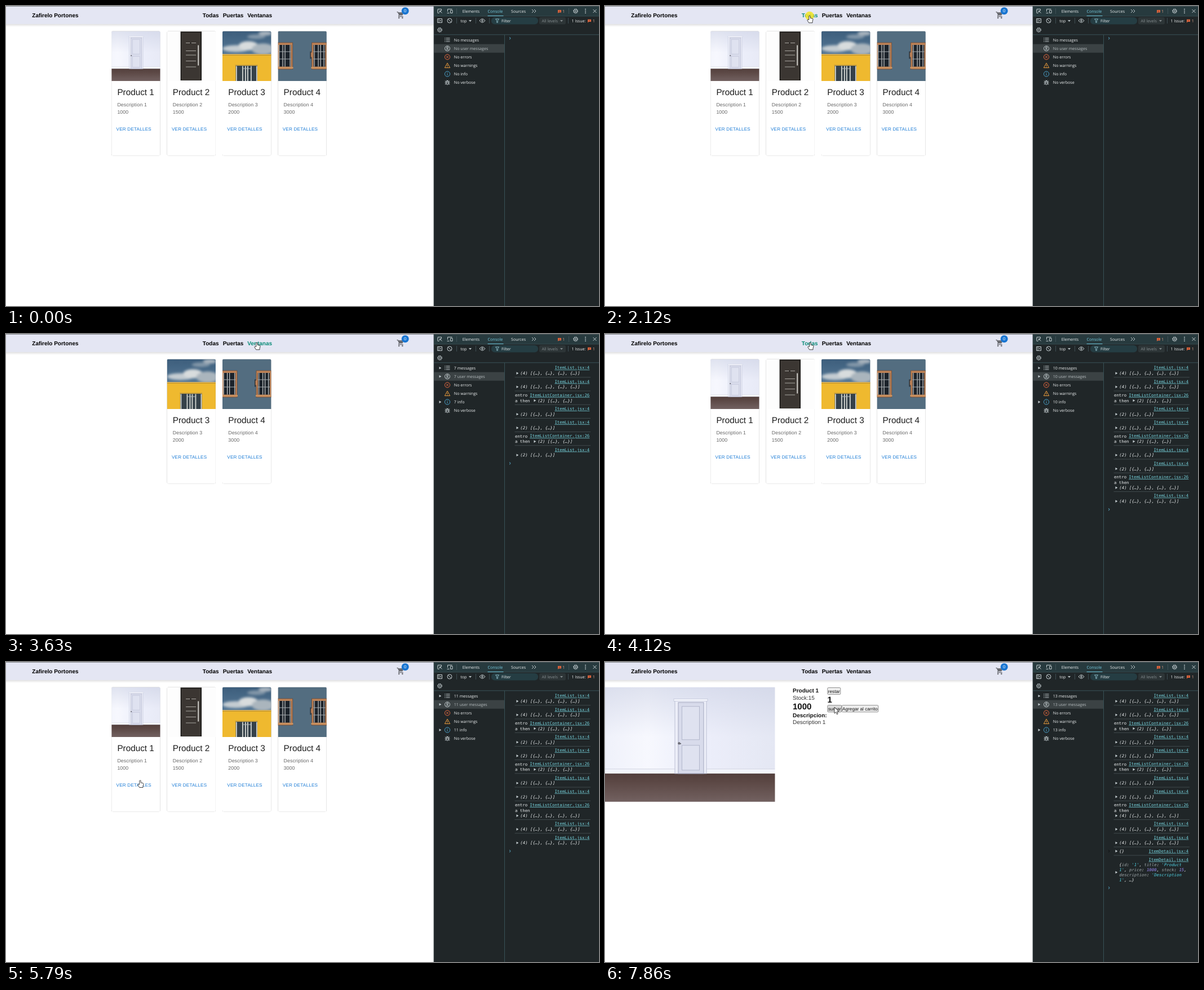
Animation, 1052 px wide and 532 px high, one loop 7.99 s. Source, as an HTML page:

```html
<!DOCTYPE html>
<html lang="es">
<head>
<meta charset="utf-8">
<title>Zafirelo Portones</title>
<style>
html, body { margin: 0; width: 100%; height: 100%; overflow: hidden; background: #fff; }
svg { display: block; width: 1052px; height: 532px; }
text { font-family: "Liberation Sans", Arial, sans-serif; text-rendering: geometricPrecision; }
.b { font-weight: bold; }
.card { filter: drop-shadow(0 .8px .7px rgba(0,0,0,.45)); }
.tools text { font: 7.1px "Open Sans", "Noto Sans", sans-serif; fill: #eceff0; }
.tools .log text { font: 7.35px "DejaVu Sans Mono", monospace; white-space: pre; }
.tools .log .i { font-style: italic; }
.tools .log .link { fill: #76d2dc; text-decoration: underline; text-anchor: end; }
.icon { fill: none; stroke: #c3cccf; stroke-width: 1; }
</style>
</head>
<body>
<svg viewBox="0 0 1052 532">
  <defs>
    <linearGradient id="wall"><stop stop-color="#eff1fa"/><stop offset=".25" stop-color="#f7f8fe"/><stop offset=".4" stop-color="#f1f3fc"/><stop offset=".6" stop-color="#eceefa"/><stop offset="1" stop-color="#e4e7f3"/></linearGradient>
    <linearGradient id="shade" x2="0" y2="1"><stop stop-color="#c3c9de" stop-opacity=".45"/><stop offset=".6" stop-color="#c3c9de" stop-opacity="0"/></linearGradient>
    <linearGradient id="floor" x2="0" y2="1"><stop stop-color="#523f3c"/><stop offset=".3" stop-color="#5c4845"/><stop offset="1" stop-color="#726160"/></linearGradient>
    <linearGradient id="sky" x2="0" y2="1"><stop stop-color="#3d5e7c"/><stop offset="1" stop-color="#6f93b1"/></linearGradient>
    <linearGradient id="under" x2="0" y2="1"><stop stop-color="#000" stop-opacity=".12"/><stop offset="1" stop-color="#000" stop-opacity="0"/></linearGradient>
    <filter id="soft"><feGaussianBlur stdDeviation="2"/></filter>
    <clipPath id="round"><path d="M0 88.5V2.5Q0 0 2.5 0H83.8Q86.3 0 86.3 2.5V88.5Z"/></clipPath>
  </defs>
  <rect width="1052" height="532" fill="#fff"/>
  <g id="page"></g>
  <rect y="32" width="759" height="5" fill="url(#under)"/>
  <rect width="759" height="32" fill="#e4e6f3"/>
  <rect width="759" height="1" fill="#85888c"/>
  <g id="nav" class="b" font-size="10"></g>
  <path transform="translate(692.8 8.7) scale(.62)" fill="#686a70" d="M7 18c-1.1 0-2 .9-2 2s.9 2 2 2 2-.9 2-2-.9-2-2-2zM1 2v2h2l3.6 7.6-1.35 2.44C4.5 15.4 5.5 17 7 17h12v-2H7.4c-.2 0-.3-.2-.2-.4L8.1 13h7.45c.75 0 1.4-.4 1.75-1L20.9 5.5c.3-.7-.2-1.5-.9-1.5H5.2l-.94-2H1zm16 16c-1.1 0-2 .9-2 2s.9 2 2 2 2-.9 2-2-.9-2-2-2z"/>
  <circle cx="708.2" cy="8.7" r="6.5" fill="#1976d2"/>
  <text x="708.2" y="11.4" font-size="7.5" fill="#fff" text-anchor="middle">0</text>
  <g class="tools">
    <g id="frame"></g>
    <g id="side"></g>
    <g id="log" class="log"></g>
  </g>
  <circle id="click" fill="#f3e526" fill-opacity=".85"/>
  <g id="cursor" stroke-linejoin="round">
    <path id="arrow" d="M0 0V11.2L2.6 8.8 4.4 12.8 6.2 12 4.5 8.1H8Z" fill="#fff" stroke="#111" stroke-width=".8"/>
    <path id="hand" d="M-1.2 7.5V.9Q0-.8 1.2.9V4.4L5 5.2Q6 5.6 6 6.8L5 10.5V12.8H-1.4L-4.2 8.2Q-4 6.2-1.2 7.5Z" fill="#fff" stroke="#111" stroke-width=".8"/>
  </g>
</svg>
<script>
const LOOP = 7990;
const $ = id => document.getElementById(id);
const rect = (x, y, w, h, fill, more = '') =>
  `<rect x="${x}" y="${y}" width="${w}" height="${h}" fill="${fill}" ${more}/>`;
const text = (x, y, s, more = '') => `<text x="${x}" y="${y}" ${more}>${s}</text>`;
const icon = (d, more = '') => `<path class="icon" d="${d}" ${more}/>`;
const ring = (x, y, r, more = '') => `<circle class="icon" cx="${x}" cy="${y}" r="${r}" ${more}/>`;
const tri = (x, y) => `<path d="M${x} ${y - 2.3}l3.8 2.3-3.8 2.3z" fill="#c3cccf"/>`;

// ---------- pictures ----------
const panel = (y, h) => rect(136.5, y, 31, h, '#dfe2f0', 'stroke="#b3b7cc"');
const whiteDoor = () =>
  rect(0, 0, 302, 203, 'url(#wall)') + rect(0, 0, 302, 145, 'url(#shade)') +
  rect(0, 145, 302, 9, '#f3f5fc') + rect(0, 144.5, 302, 1, '#d2d5e2') +
  rect(0, 153, 302, 50, 'url(#floor)') +
  rect(124, 23, 56, 130, '#eceef8', 'stroke="#bcc0d4"') +
  rect(122, 20.5, 60, 4, '#f3f5fc', 'stroke="#bcc0d4" stroke-width=".7"') +
  rect(130, 27, 45, 126, '#d8dbeb', 'stroke="#a4a8bf"') +
  panel(34, 59) + panel(103, 44) +
  '<path d="M130 100h5" stroke="#55565e" stroke-width="1.6"/><circle cx="131.5" cy="99.5" r="2.2" fill="#6d6e77"/>';

const darkDoor = () =>
  rect(0, 0, 87, 89, '#fdfdfd') +
  rect(24, .8, 37.5, 86.7, '#24211f') + rect(27, 4, 31.5, 82, '#3b3632', 'stroke="#4f4943" stroke-width=".7"') +
  [20.5, 34.5, 42, 52.5, 63].map(y => rect(33.5, y, 18, 1, '#aaa7a2')).join('') +
  rect(54.7, 25, 1.8, 36, '#d9d7d2') + rect(41, 20, 2, 2.4, '#191716');

const cloud = (x, y, rx, ry, c) => `<ellipse cx="${x}" cy="${y}" rx="${rx}" ry="${ry}" fill="${c}"/>`;
const yellowHouse = () =>
  rect(0, 0, 87, 89, 'url(#sky)') +
  `<g filter="url(#soft)">${cloud(24, 31, 24, 6, '#c4ccd1')}${cloud(46, 26, 17, 8, '#d8dcdd')}` +
  `${cloud(72, 32, 20, 10, '#aab5bd')}${cloud(60, 10, 16, 4, '#8296a8')}${cloud(76, 4, 12, 4, '#a7b3bd')}</g>` +
  rect(0, 41, 87, 48, '#efb92f') + rect(0, 40.5, 87, 1.8, '#d6b264') + rect(0, 42.3, 87, 1, '#bd8f22') +
  rect(22.5, 59.5, 40, 2, '#caa03a') + rect(23.5, 61.5, 38.5, 28, '#35414a') +
  [24, 35, 40, 44, 50, 60].map(x => rect(x, 62, 1.7, 27, '#d9dcd8')).join('') + rect(36, 66, 14, 1, '#b9c0c0');

const blueWindow = (x, bars) =>
  rect(x, 20.5, 27, 47, '#bd8257', 'stroke="#6b4935" stroke-width=".8"') +
  rect(x + 3, 24.5, 21, 38.5, '#1b222a') +
  bars.map(b => rect(x + b, 24.5, 1.2, 38.5, '#c7c9c9')).join('') +
  [36, 49].map(y => rect(x + 3, y, 21, 1, '#a8aeb1')).join('') +
  rect(x - 1, 63.5, 29, 3, '#ca915f');
const blueHouse = () =>
  rect(0, 0, 87, 89, '#536d80') + blueWindow(-1, [2.5, 9, 13, 22]) + blueWindow(60, [4, 11, 15, 21]) +
  rect(57, 36, 2, 13, '#2c3338') + rect(58.5, 38, 3, 8, '#b97f57');

const pictures = [
  () => `<g transform="translate(-22.5 0) scale(.436)">${whiteDoor()}</g>`,
  darkDoor, yellowHouse, blueHouse
];
const prices = [1000, 1500, 2000, 3000];

// ---------- shop pages ----------
const card = (n, x) => `<g transform="translate(${x} 44.5)">
  <g class="card">${rect(0, 0, 86.3, 220.8, '#fff', 'rx="2.5"')}</g>
  <g clip-path="url(#round)">${pictures[n - 1]()}</g>
  ${text(10.2, 113.3, 'Product ' + n, 'font-size="15.3" fill="#1c1c1c"')}
  <g font-size="8.8" letter-spacing=".09" fill="#666">${text(10.2, 133.4, 'Description ' + n)}${text(10.2, 146.2, prices[n - 1])}</g>
  ${text(8.3, 176.6, 'VER DETALLES', 'font-size="8.1" letter-spacing=".23" fill="#1c7cd6"')}</g>`;

const listPage = ids => ids.map((n, i) => card(n, 187.2 + 98.4 * (i + (4 - ids.length) / 2))).join('');

const button = (x, y, w, s, hot) =>
  rect(x, y, w, 12, hot ? '#dcdcdc' : '#efefef', 'rx="1.5" stroke="#767676" stroke-width=".8"') +
  text(x + w / 2, y + 9, s, 'font-size="8.2" text-anchor="middle"');

const detailPage = hot => `<g transform="translate(0 44.8)">${whiteDoor()}</g>` +
  rect(301.5, 44, 3, 205, '#fff') +
  `<g font-size="10" fill="#111">${text(333, 54, 'Product 1', 'class="b"')}${text(333, 66.6, 'Stock:15', 'fill="#333"')}` +
  text(333, 84, '1000', 'class="b" font-size="15"') + text(333, 97.6, 'Descripcion:', 'class="b"') +
  text(333, 110.4, 'Description 1', 'fill="#333"') + text(394.6, 72.3, '1', 'class="b" font-size="15"') +
  button(394.8, 45.5, 23, 'restar', hot === 'restar') + button(394.8, 76.7, 25, 'sumar', hot === 'sumar') +
  button(420.2, 76.7, 64.6, 'Agregar al carrito') + '</g>';

const links = [['Todas', 348.8, 378], ['Puertas', 384.7, 422], ['Ventanas', 428.2, 473]];
const navBar = hot => text(46.3, 19.6, 'Zafirelo Portones') +
  links.map(([s, x]) => text(x, 19.6, s, hot === s ? 'fill="#0a8c78"' : '')).join('');

// ---------- developer tools ----------
const bubble = (x, y) => `<path d="M${x} ${y - 2.7}h6v4.4h-4.4l-1.6 1.6z" fill="#e0673f"/>` +
  `<path d="M${x + 1.6} ${y - .6}h2.8" stroke="#5b2a1b" stroke-width=".8"/>`;
const gear = (x, y) => ring(x, y, 3.1) + ring(x, y, 4, 'stroke-dasharray="1.6 1.54"') + ring(x, y, 1, 'stroke-width=".8"');
const drop = (x, y) => `<path d="M${x} ${y}h5l-2.5 3z" fill="#b9c2c5"/>`;
const divider = (x, y) => rect(x, y - 5, .8, 10, '#47585d');

const frame = () => rect(759, 0, 293, 532, '#202628') + rect(759, 1, 293, 17, '#273a3e') +
  rect(759, 0, 293, 1, '#4a5559') + rect(759, 17.6, 293, .8, '#3b5055') + rect(759, 50.4, 293, .9, '#3c565c') +
  rect(884, 51, .9, 481, '#3c565c') + rect(758.6, 0, .8, 532, '#3a4649') +
  icon('M766 9V5.500h6.500V8M766 8v4.500h2.500M769.500 8.500l4 4M769.500 11.500v-3h3') +
  icon('M783.500 10V5.500h8M782.500 12.500h4M788.500 7.500h3.500v5h-3.500z') + divider(799, 9) +
  text(809.7, 11.7, 'Elements') + text(854.6, 11.7, 'Console', 'style="fill:#79cfe4"') + rect(854.5, 17, 28, 1, '#6fc6db') +
  text(896, 11.7, 'Sources') + icon('M933 6l3 3-3 3M937 6l3 3-3 3') +
  bubble(979, 9.8) + text(987, 12.3, '1', 'style="fill:#e0a48c"') + divider(998, 9) + gear(1010.5, 9) +
  [5.8, 9, 12.2].map(y => `<circle cx="1028" cy="${y}" r=".95" fill="#c3cccf"/>`).join('') + icon('M1041.500 6l6 6M1047.500 6l-6 6') +
  icon('M765.500 22.500h8v7h-8zM768 22.500v7M772 24.500l-2 1.500 2 1.500') + ring(787, 26, 4) + icon('M784.200 23.200l5.600 5.600') +
  divider(799, 26) + text(806.3, 28.7, 'top') + drop(821, 25) + divider(833, 26) +
  icon('M840 26q5-6.500 10 0q-5 6.500-10 0z') + ring(845, 26, 1.4) + divider(857, 26) +
  rect(861, 20, 83, 12.4, '#253d43', 'rx="6"') + `<path d="M868.500 23h6l-2.200 3v3.300h-1.600V26z" fill="none" stroke="#9fd0dc" stroke-width=".8"/>` +
  text(879, 28.7, 'Filter') + rect(946, 20, 47, 12.4, '#2d3537', 'rx="3"') +
  text(950.5, 28.7, 'All levels', 'style="fill:#848d90"') + `<g opacity=".6">${drop(983, 25)}</g>` +
  divider(997, 26) + text(1003.5, 28.7, '1 Issue:') + bubble(1032, 26.4) + text(1040.8, 28.7, '1', 'style="fill:#e0a48c"') + gear(769.5, 42.4);

const sideIcons = [
  icon('M780.500 57h7M780.500 60h7M780.500 63h7M778 57h1.300M778 60h1.300M778 63h1.300'),
  ring(783, 75.3, 4.5) + ring(783, 74, 1.5) + icon('M780 78.600q3-3.500 6 0'),
  ring(783, 90.4, 4.6, 'style="stroke:#e0673f"') + icon('M781 88.400l4 4M785 88.400l-4 4', 'style="stroke:#e0673f"'),
  icon('M783 101l4.700 8.500h-9.400zM783 104v2.800M783 107.500v1', 'style="stroke:#e79a3c"'),
  ring(783, 120.5, 4.6, 'style="stroke:#4aa3cd"') + icon('M783 119.800v3M783 117.800v1', 'style="stroke:#4aa3cd"'),
  icon('M781 133.500h4v5q-2 2-4 0zM778.800 133l2 1M778.500 136h2.500M778.800 139l2-1M787.200 133l-2 1M787.500 136H785M787.200 139l-2-1M781.500 131.500l1.500 1.500 1.500-1.500M781 136h4')
];
const sideBar = n => {
  const many = s => `${n || 'No'} ${s}${n === 1 ? '' : 's'}`;
  const labels = [many('message'), many('user message'), 'No errors', 'No warnings', `${n || 'No'} info`, 'No verbose'];
  return rect(759, 67.6, 125, 15.2, '#3b4244') + labels.map((s, i) => {
    const y = 60.2 + 15.1 * i;
    return sideIcons[i] + text(794.8, y + 2.6, s, i === 1 ? 'style="fill:#b6bdbf"' : '') +
      (n && [0, 1, 4].includes(i) ? tri(768.5, y) : '');
  }).join('');
};

// kind + item count: L = list, T = "then" branch, E = empty detail, D = filled detail
const messages = 'L4 L4 T2 L2 L2 T2 L2 L2 T4 L4 L4 E D'.split(' ');
const line = (x, y, s) => text(x, y + 2.6, s, 'class="i"');
const link = (y, s) => text(1035.3, y + 2.4, s, 'class="link"');
const tint = (c, s) => `<tspan fill="${c}">${s}</tspan>`;
const key = s => tint('#9aa3a6', s), str = s => tint('#4fcfe0', s), num = s => tint('#9a86f5', s);
const prompt = (y, c) => icon(`M893 ${y - 2}l2.200 2-2.200 2`, `style="stroke:${c}"`);

function message([kind, n], y) {
  const items = `(${n}) [${Array(+n || 0).fill('{…}').join(', ')}]`;
  if (kind === 'L') return [24.2, link(y, 'ItemList.jsx:4') + tri(905.5, y + 9.6) + line(912.3, y + 9.6, items)];
  if (kind === 'T') {
    const wide = n > 2, dy = wide ? 19 : 9.6;
    return [wide ? 33.4 : 24.2, text(903, y + 2.6, 'entro') + link(y, 'ItemListContainer.jsx:26') +
      text(903, y + 12.2, 'a then') + tri(wide ? 905.5 : 936.5, y + dy) + line(wide ? 912.3 : 943.2, y + dy, items)];
  }
  if (kind === 'E') return [14.9, prompt(y, '#0d1011') + tri(905.5, y) + line(912.3, y, '{}') + link(y, 'ItemDetail.jsx:4')];
  const rows = [
    `{${key('id')}: ${str("'1'")}, ${key('title')}: ${str("'Product")}`,
    `${str("1'")}, ${key('price')}: ${num(1000)}, ${key('stock')}: ${num(15)},`,
    `${key('description')}: ${str("'Description")}`,
    `${str("1'")}, …}`
  ];
  return [50.2, link(y, 'ItemDetail.jsx:4') + tri(905.5, y + 22.7) +
    rows.map((s, i) => line(912.3, y + 9 + 9.1 * i, s)).join('')];
}

function consoleLog(n) {
  let y = n ? 60 : 57.3, out = '';
  messages.slice(0, n).forEach((m, i) => {
    const [h, body] = message(m, y);
    if (i) out += rect(902.5, y - 7.8, 134.5, .8, '#465154');
    out += body;
    y += h;
  });
  return out + prompt(y, '#5cb0cf');
}

// ---------- timeline ----------
const all = [1, 2, 3, 4];
// time, counted messages, shown messages, products (null = detail page)
const steps = [
  [0, 0, 0, all], [2190, 1, 1, all], [3000, 2, 2, all], [3070, 4, 4, [1, 2]],
  [3520, 5, 5, [1, 2]], [3590, 7, 7, [3, 4]], [3980, 8, 8, [3, 4]], [4050, 10, 10, all],
  [4820, 11, 11, all], [6280, 13, 12, null], [6420, 13, 13, null]
];
const path = [
  [130, 944, 496], [200, 800, 430], [270, 637, 355], [410, 637, 355], [470, 520, 285], [540, 370, 195],
  [610, 267, 139], [740, 267, 139], [1010, 198, 105], [1300, 316, 62], [1570, 352, 26], [1650, 361, 19],
  [1970, 363, 17], [2550, 363, 17], [2730, 404, 16], [3180, 404, 16], [3400, 445, 15], [3720, 445, 15],
  [3850, 364, 15], [4140, 364, 15], [4540, 131, 24], [4610, 119, 19], [4680, 114, 17], [4920, 114, 17],
  [5370, 215, 108], [5900, 244, 236], [6200, 242, 219], [6430, 241, 220], [7030, 362, 154],
  [7430, 404, 51], [7580, 404, 51], [7840, 407, 80]
];
const clicks = [2120, 2900, 3440, 3880, 4740, 6200], CLICK = 140;

function pointAt(t) {
  const i = path.findIndex(p => p[0] > t);
  if (i < 0) return path[path.length - 1].slice(1);
  if (!i) return null;
  const [t0, x0, y0] = path[i - 1], [t1, x1, y1] = path[i], k = (t - t0) / (t1 - t0);
  return [x0 + (x1 - x0) * k, y0 + (y1 - y0) * k];
}

function hoverAt([x, y], products) {
  const inside = (l, t, r, b) => x >= l && x <= r && y >= t && y <= b;
  if (inside(46, 9, 129, 24)) return 'brand';
  const hit = links.find(([, l, r]) => inside(l, 9, r, 25));
  if (hit) return hit[0];
  if (products) return inside(191, 208, 263, 229) ? 'details' : '';
  return inside(395, 45, 418, 58) ? 'restar' : inside(395, 76, 420, 89) ? 'sumar' : '';
}

const drawn = {};
function put(id, state, make) {
  if (drawn[id] === state) return;
  drawn[id] = state;
  $(id).innerHTML = make();
}
const show = (id, on) => $(id).setAttribute('display', on ? 'inline' : 'none');

function draw(t) {
  const [, count, shown, products] = steps.filter(s => s[0] <= t).pop();
  const p = pointAt(t), hot = p ? hoverAt(p, products) : '';
  put('page', products ? 'list' + products : 'detail' + hot, () => products ? listPage(products) : detailPage(hot));
  put('nav', hot, () => navBar(hot));
  put('side', count, () => sideBar(count));
  put('log', shown, () => consoleLog(shown));

  show('cursor', p);
  const start = clicks.find(c => t >= c && t < c + CLICK && (products || c < 6200));
  show('click', start);
  if (!p) return;
  const hand = ['brand', 'details', 'Todas', 'Puertas', 'Ventanas'].includes(hot);
  show('hand', hand);
  show('arrow', !hand);
  $('cursor').setAttribute('transform', `translate(${p})`);
  if (start) {
    $('click').setAttribute('cx', p[0]);
    $('click').setAttribute('cy', p[1] + .5);
    $('click').setAttribute('r', 7.8 + 2 * (t - start) / CLICK);
  }
}

$('frame').innerHTML = frame();
const begin = performance.now();
function tick() {
  draw((performance.now() - begin) % LOOP);
  requestAnimationFrame(tick);
}
tick();
</script>
</body>
</html>
```
